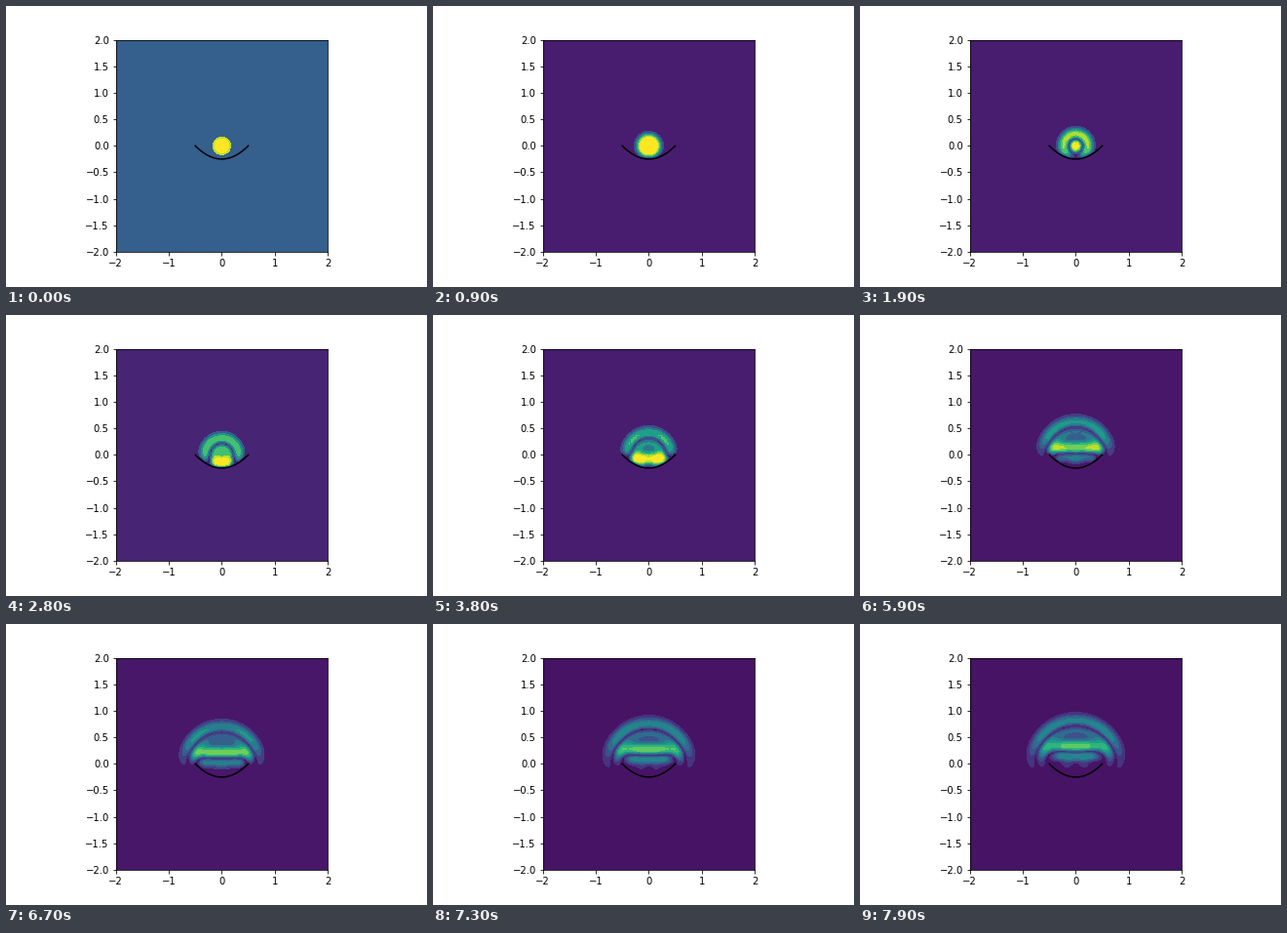
A matplotlib script for the animation above (8 s loop, 432 by 288 pixels).

```python
import numpy as np
import matplotlib.pyplot as plt
from matplotlib.animation import FuncAnimation

FRAMES = 80
N = 101
DT = 0.01
WIDTH = 0.12

axis = np.linspace(-2, 2, N)
dx = axis[1] - axis[0]
X, Y = np.meshgrid(axis, axis)


def parabola(x):
    return x**2 - 0.25


def laplacian(u):
    out = np.zeros_like(u)
    out[1:-1, 1:-1] = (u[2:, 1:-1] + u[:-2, 1:-1] + u[1:-1, 2:]
                       + u[1:-1, :-2] - 4 * u[1:-1, 1:-1])
    return out


def simulate():
    """Pulse released at the focus of a parabolic mirror held at u = 0."""
    cols = np.flatnonzero(np.abs(axis) <= 0.5 + 1e-9)
    rows = np.rint((parabola(axis[cols]) + 2) / dx).astype(int)
    k = (DT / dx)**2

    u = np.exp(-(X**2 + Y**2) / WIDTH**2)
    prev = u + 0.5 * k * laplacian(u)
    states = [u]
    for _ in range(FRAMES - 1):
        u, prev = 2 * u - prev + k * laplacian(u), u
        u[rows, cols] = 0
        states.append(u)
    return np.abs(states)


states = simulate()

fig = plt.figure(figsize=(6, 4), dpi=72, facecolor="white")
ax = fig.add_subplot()
fig.subplots_adjust(left=0.125, right=0.9, bottom=0.125, top=0.88)
mirror_x = np.linspace(-0.5, 0.5, 100)
ax.plot(mirror_x, parabola(mirror_x), color="black", lw=1.5)
layers = []


def draw(i):
    while layers:
        layers.pop().remove()
    layers.append(ax.contourf(X, Y, states[i], vmin=0, vmax=0.25,
                              cmap="viridis"))
    ax.set(xlim=(-2, 2), ylim=(-2, 2), aspect="equal",
           xticks=np.arange(-2, 3), yticks=np.arange(-2, 2.1, 0.5))
    return layers


anim = FuncAnimation(fig, draw, frames=FRAMES, interval=100, repeat=True,
                     blit=False)
plt.show()
```
